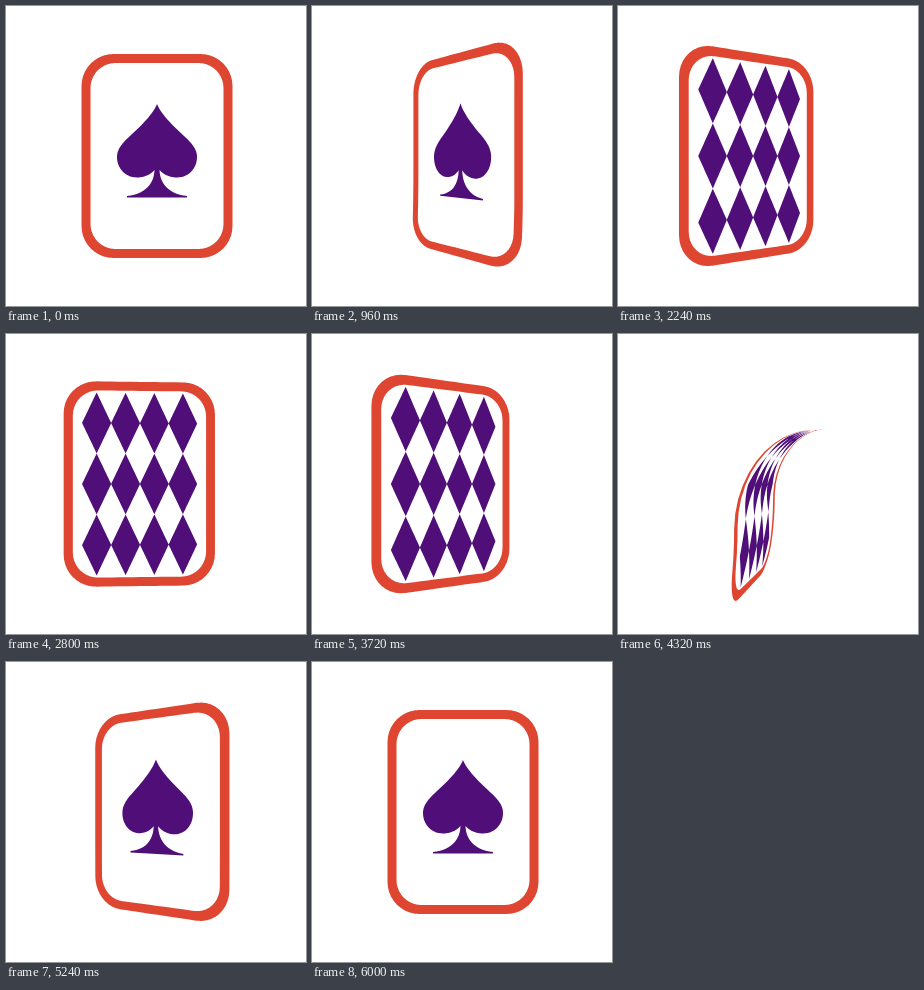
An HTML page with a canvas for the animation above (6040 ms loop, 300 by 300 pixels).

```html
<!DOCTYPE html>
<html lang="en">
<head>
<meta charset="utf-8">
<title>Card flip</title>
<style>
html, body { margin: 0; width: 100%; height: 100%; overflow: hidden; background: #fff; }
canvas { display: block; }
</style>
</head>
<body>
<canvas id="stage" width="300" height="300"></canvas>
<script>
const ctx = document.getElementById('stage').getContext('2d');
const RED = '#de4631', PURPLE = '#500f78';
const LOOP = 6040, STEP = 40, HALF = 3000;
const DEPTH = 390, HINGE = 26, SLANT = 0.14;
const { PI, sin, cos, abs, min, max } = Math;

// Outlines in card coordinates, origin at the card's centre
function divide(corners, n = 16) {
  return corners.flatMap(([x, y], i) => {
    const [p, q] = corners[(i + 1) % corners.length];
    return Array.from({ length: n }, (_, k) => [x + (p - x) * k / n, y + (q - y) * k / n]);
  });
}

function roundRect(w, h, r) {
  const points = [];
  [[1, 1], [-1, 1], [-1, -1], [1, -1]].forEach(([sx, sy], i) => {
    for (let k = 0; k <= 10; k++) {
      const a = (i + k / 10) * PI / 2;
      points.push([sx * (w - r) + r * cos(a), sy * (h - r) + r * sin(a)]);
    }
  });
  return divide(points, 12);
}

function cubic([a, b, c, d, e, f, g, h], n = 14) {
  return Array.from({ length: n + 1 }, (_, i) => {
    const t = i / n, s = 1 - t;
    const mix = (p, q, r, w) => s * s * s * p + 3 * s * s * t * q + 3 * s * t * t * r + t * t * t * w;
    return [mix(a, c, e, g), mix(b, d, f, h)];
  });
}

const leftHalf = [
  [0, -52, -4, -42, -16, -30, -27, -20],
  [-27, -20, -36, -12, -40, -6, -40, 1],
  [-40, 1, -40, 13, -31, 21.5, -20, 21.5],
  [-20, 21.5, -12, 21.5, -6, 18, -2.5, 14],
  [-2.5, 14, -3, 28, -12, 38, -30, 40]
].flatMap(c => cubic(c)).concat([[-30, 41.5]]);
const spade = leftHalf.concat(leftHalf.map(([x, y]) => [-x, y]).reverse());

const diamonds = [];
for (let i = 0; i < 12; i++) {
  const x = (i % 4 - 1.5) * 28.7, y = ((i >> 2) - 1) * 60.7;
  diamonds.push(divide([[x, y - 30.3], [x + 14.4, y], [x, y + 30.3], [x - 14.4, y]]));
}

const outer = roundRect(75.5, 102, 32), inner = roundRect(66.5, 93, 25);

// Half turn at constant speed, with soft start and stop
function turn(t) {
  const ramp = 790, total = 3030, speed = PI / (total - ramp);
  if (t < ramp) return speed * t * t / (2 * ramp);
  if (t > total - ramp) return PI - speed * (total - t) ** 2 / (2 * ramp);
  return speed * (t - ramp / 2);
}

const bell = (t, mid, half) => abs(t - mid) < half ? cos(PI / 2 * (t - mid) / half) ** 2 : 0;

// Returns the projection from card to screen at time t
function makeView(t) {
  const a = turn(t);
  const top = {
    k: 1.5 * bell(t, 1680, 381) / 128,
    dir: min(90, max(0, 32 + (t - 1680) * 0.2)) * PI / 180
  };
  const bottom = {
    k: 0.5 * bell(t, 1320, 700) / 76,
    dir: (105 + (t - 960) * 0.0625) * PI / 180
  };

  return ([u, y]) => {
    let x = -7.5 + (u + 8.5) * cos(a), z = (u + 8.5) * sin(a);
    const fold = HINGE + SLANT * u;
    const { k, dir } = y < fold ? top : bottom;
    if (k > 1e-6) {
      const angle = k * (y - fold), shift = (1 - cos(angle)) / k;
      y = fold + sin(angle) / k;
      x += shift * cos(dir);
      z -= shift * sin(dir);
    }
    const s = DEPTH / (DEPTH - z);
    return [150 + x * s, 150 + y * s];
  };
}

function trace(points, view) {
  points.forEach((p, i) => ctx[i ? 'lineTo' : 'moveTo'](...view(p)));
  ctx.closePath();
}

function fill(shapes, color, view) {
  ctx.fillStyle = color;
  ctx.beginPath();
  shapes.forEach(s => trace(s, view));
  ctx.fill();
}

// Limits drawing to the strips, parallel to the fold, that show the given side
function clipSide(front, view) {
  const n = 64, w = 80, h = 122, skew = SLANT * w;
  ctx.beginPath();
  for (let i = 0; i < n; i++) {
    const y = -h + i * 2 * h / n, q = y + 2 * h / n;
    const strip = [[-w, y - skew], [w, y + skew], [w, q + skew], [-w, q - skew]];
    const [[ax, ay], [bx, by], , [cx, cy]] = strip.map(view);
    const facing = (bx - ax) * (cy - ay) - (by - ay) * (cx - ax) > 0;
    if (facing === front) trace(strip, view);
  }
  ctx.clip();
}

function draw(time) {
  const t = Math.floor(time % LOOP / STEP) * STEP;
  const view = makeView(t < HALF ? t : 2 * HALF - t);
  ctx.fillStyle = '#fff';
  ctx.fillRect(0, 0, 300, 300);
  for (const front of [true, false]) {
    ctx.save();
    clipSide(front, view);
    fill([outer], RED, view);
    fill([inner], '#fff', view);
    fill(front ? [spade] : diamonds, PURPLE, view);
    ctx.restore();
  }
}

function tick() {
  draw(performance.now());
  requestAnimationFrame(tick);
}
tick();
</script>
</body>
</html>
```
